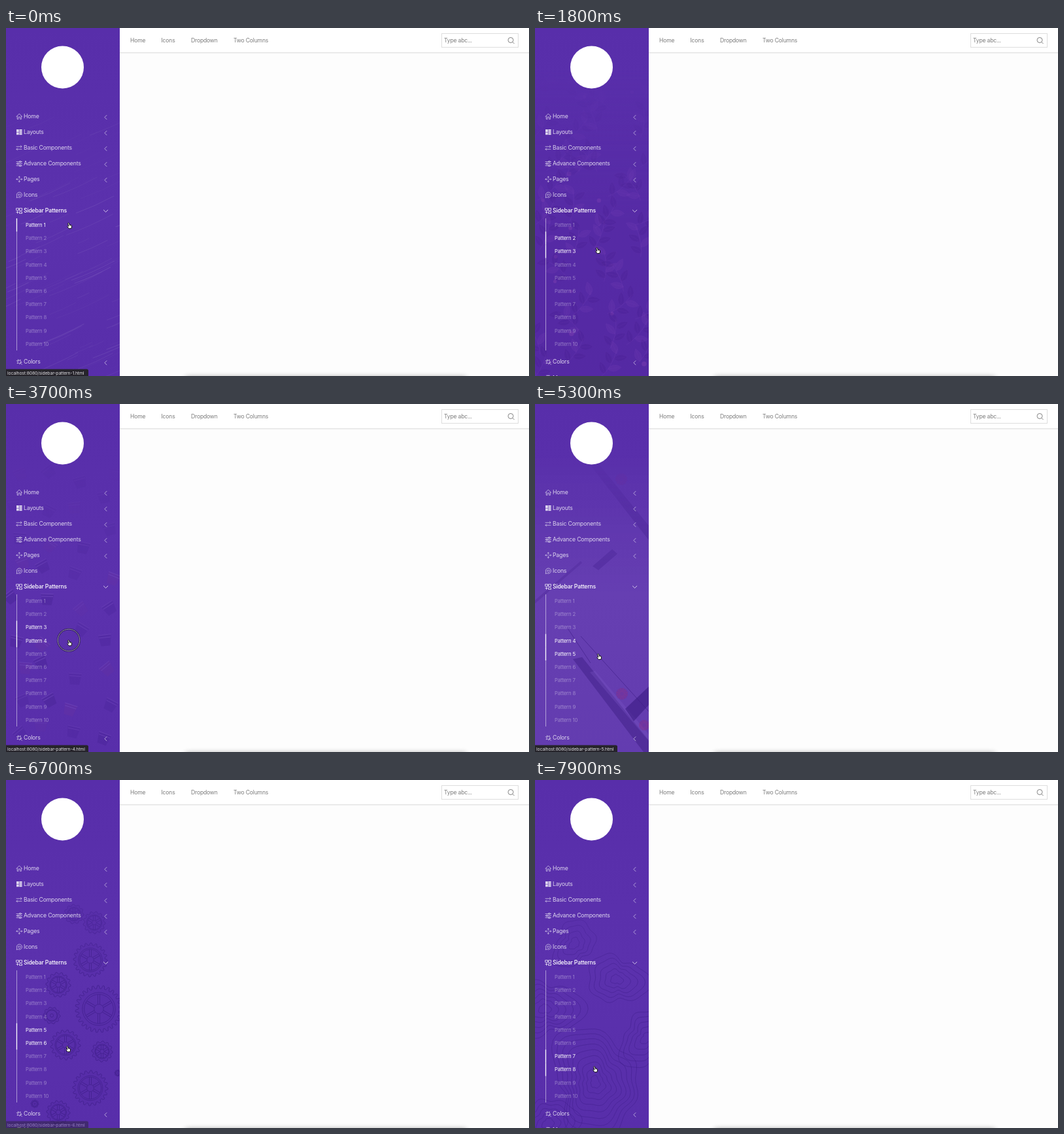
Write an HTML page that moves like this. It is 800 px wide and 532 px high and loops after 8 s.

```html
<!DOCTYPE html>
<html lang="en">
<head>
<meta charset="utf-8">
<title>Sidebar patterns</title>
<style>
html, body { margin: 0; width: 100%; height: 100%; overflow: hidden; background: #fdfdfd; }
svg { display: block; width: 100vw; height: 100vh; }
text { font: 8.7px Inter, Roboto, sans-serif; letter-spacing: -.022em; }
.nav text { font-size: 8.6px; fill: #7c7c7c; }
.menu text { fill: #ddd5ee; }
.menu text.open { fill: #fff; font-weight: 500; }
.icon { fill: none; stroke: #ddd5ee; stroke-width: .7; stroke-linejoin: round; stroke-linecap: round; }
.icon.open { stroke: #fff; }
.icon.solid { fill: #ddd5ee; stroke: none; }
.sub text { font-size: 7.8px; fill: #fff; fill-opacity: .38; }
.sub rect { fill: #fff; opacity: 0; }
.sub .on text { fill-opacity: 1; }
.sub .on rect { opacity: 1; }
#status text { font-size: 6.85px; fill: #dcdcdf; }
</style>
</head>
<body>
<svg id="stage" viewBox="0 0 800 532">
  <defs>
    <clipPath id="side"><rect width="174" height="532"/></clipPath>
    <linearGradient id="purple" x2="0" y2="1">
      <stop stop-color="#582eaa"/><stop offset=".55" stop-color="#5b31ad"/><stop offset="1" stop-color="#582eaa"/>
    </linearGradient>
    <linearGradient id="fade" x2="0" y2="1">
      <stop offset=".12" stop-color="#000"/><stop offset=".55" stop-color="#fff"/>
    </linearGradient>
    <mask id="sink" maskUnits="userSpaceOnUse" x="0" y="0" width="174" height="532">
      <rect width="174" height="532" fill="url(#fade)"/>
    </mask>
    <filter id="soft" x="-10%" y="-150%" width="120%" height="400%"><feGaussianBlur stdDeviation="4.2"/></filter>
  </defs>

  <rect width="800" height="532" fill="#fdfdfd"/>
  <rect x="174" width="626" height="37.5" fill="#fff"/>
  <rect x="174" y="37.3" width="626" height="1.1" fill="#dcdcdc"/>
  <rect x="274" y="534" width="430" height="18" rx="4" opacity=".45" filter="url(#soft)"/>
  <g class="nav">
    <text x="190" y="22.3">Home</text>
    <text x="237.5" y="22.3">Icons</text>
    <text x="283" y="22.3">Dropdown</text>
    <text x="348" y="22.3">Two Columns</text>
    <rect x="666.5" y="8.5" width="117" height="21" fill="#fff" stroke="#dedede"/>
    <text x="670" y="22.3">Type abc...</text>
    <path d="M776 18.5a4 4 0 1 1-8 0a4 4 0 1 1 8 0M775 21.5l2.6 2.6" fill="none" stroke="#777" stroke-width=".9"/>
  </g>

  <rect width="174" height="532" fill="url(#purple)"/>
  <g clip-path="url(#side)"><g id="art" mask="url(#sink)"></g></g>
  <circle cx="86.5" cy="60" r="32.5" fill="#fff"/>
  <g id="menu" class="menu"></g>
  <g id="sub" class="sub"><path d="M16.5 291V493" stroke="#fff" stroke-opacity=".5"/></g>
  <g id="status">
    <path d="M0 521.5H123.5Q126 521.5 126 524V532H0Z" fill="#26242b"/>
    <text x="2" y="529.7"></text>
  </g>
  <g id="ring" fill="none">
    <circle r="16.8" stroke="#2a1a50" stroke-width="2.4"/>
    <circle r="16.8" stroke="#b8afc8" stroke-width=".8"/>
  </g>
  <g id="hand" stroke="#111" stroke-linejoin="round" stroke-linecap="round">
    <path d="M-1.3.5Q-.6-.8.3.2L1.2 2.8L3.4 3.3Q4.7 3.6 4.5 5L4.2 8.2L.6 8.8L-2.3 5.7Q-2 4.4-.4 5Z" fill="#fff" stroke-width="1"/>
    <path d="M1.2 2.8L1.5 4M2.7 3.2L2.9 4.3" stroke-width=".6"/>
  </g>
</svg>
<script>
const $ = id => document.getElementById(id);

function add(parent, tag, attrs, text) {
  const node = document.createElementNS('http://www.w3.org/2000/svg', tag);
  for (const key in attrs) node.setAttribute(key, attrs[key]);
  if (text) node.textContent = text;
  return parent.appendChild(node);
}

let seed = 7;
const rand = (lo, hi) => {
  seed = (seed * 16807) % 2147483647;
  return lo + (hi - lo) * seed / 2147483647;
};

// Closed path from a radius function of the angle.
function polar(x, y, count, radius) {
  let d = '';
  for (let i = 0; i < count; i++) {
    const a = i / count * 2 * Math.PI, r = radius(a, i);
    d += (i ? 'L' : 'M') + (x + r * Math.cos(a)).toFixed(1) + ' ' + (y + r * Math.sin(a)).toFixed(1);
  }
  return d + 'Z';
}

/* Sidebar artwork, one function per pattern */

function strokes(g) {
  for (let i = 0; i < 85; i++) {
    const x = rand(-40, 170), y = rand(120, 540), len = rand(15, 85);
    add(g, 'path', {
      d: `M${x} ${y}q${len / 2} ${-len * .18} ${len} ${-len * .45}`,
      fill: 'none', stroke: '#fff', 'stroke-opacity': rand(.03, .1), 'stroke-width': rand(.5, 1.1)
    });
  }
}

function leaves(g) {
  add(g, 'rect', { width: 174, height: 532, fill: '#4f2099', opacity: .35 });
  for (let i = 0; i < 40; i++) {
    const x = (i % 4) * 48 + rand(-12, 22), y = 110 + Math.floor(i / 4) * 46 + rand(-12, 22);
    const sprig = add(g, 'g', { transform: `translate(${x} ${y}) rotate(${rand(-150, -20)})` });
    add(sprig, 'path', { d: 'M0 0Q20 7 48 0', fill: 'none', stroke: '#7a45b8', 'stroke-opacity': .3, 'stroke-width': .8 });
    for (let k = 0; k < 5; k++) {
      add(sprig, 'path', {
        d: 'M0 0Q8-10 21 0Q8 10 0 0ZM0 0H17',
        transform: `translate(${6 + k * 9} 3) rotate(${k % 2 ? 52 : -52})`,
        fill: (i + k) % 3 ? '#3f1b86' : '#7a3fb2', 'fill-opacity': .2, stroke: '#7a45b8', 'stroke-opacity': .2, 'stroke-width': .6
      });
    }
    if (i % 3 === 0) add(g, 'circle', { cx: rand(5, 170), cy: y, r: rand(2.5, 4), fill: '#8444b4', opacity: .4 });
  }
}

function cups(g) {
  for (let i = 0; i < 36; i++) {
    const x = (i % 4) * 46 + rand(5, 30), y = 100 + Math.floor(i / 4) * 50 + rand(-10, 20);
    const cup = add(g, 'g', { transform: `translate(${x} ${y}) rotate(${rand(-40, 40)})`, opacity: rand(.15, .35) });
    add(cup, 'path', { d: 'M-10-8H10L7 9H-7Z', fill: i % 3 ? '#42208f' : '#6a34a0' });
    add(cup, 'path', { d: 'M-10-8H10M-9-4H9', stroke: '#8a62cc', 'stroke-width': 1 });
  }
}

function rulers(g) {
  add(g, 'rect', { width: 174, height: 532, fill: '#fff', opacity: .07 });
  const shape = (d, fill, opacity) => add(g, 'path', { d, fill, opacity });
  shape('M78 85L92 85L174 186V208Z', '#3e1d85', .45);
  shape('M58 390L72 387L174 514V532H166Z', '#3b1b82', .45);
  shape('M84 410L92 408L174 505V515Z', '#7a55c4', .35);
  shape('M138 466L174 432V460L151 485Z', '#38187f', .55);
  shape('M88 248L118 222L126 229L97 254Z', '#42208d', .4);
  shape('M0 300L70 240L72 243L0 305Z', '#42208d', .3);
  add(g, 'path', { d: 'M50 343L85 396M70 355L174 470', stroke: '#3e1d85', 'stroke-width': 1, opacity: .6 });
  for (const [x, y, r] of [[133, 443, 9], [167, 491, 8], [132, 115, 9]]) {
    add(g, 'circle', { cx: x, cy: y, r, fill: '#7c2b8c', opacity: .4 });
    add(g, 'path', { d: polar(x, y, 24, (a, i) => i % 2 ? r : 3), fill: 'none', stroke: '#8d3b92', 'stroke-width': .5, opacity: .6 });
  }
}

function gears(g) {
  const spots = [[142, 350, 36], [129, 275, 26], [80, 313, 19], [91, 405, 23], [147, 415, 16], [129, 471, 27],
    [80, 508, 18], [44, 495, 6], [135, 218, 17], [70, 360, 13], [171, 448, 5], [104, 205, 15]];
  for (const [x, y, r] of spots) {
    const gear = add(g, 'g', { fill: 'none', stroke: '#35177d', 'stroke-width': 1, opacity: .5 });
    const teeth = Math.max(8, Math.round(r * .75));
    add(gear, 'path', { d: polar(x, y, teeth * 4, (a, i) => i % 4 < 2 ? r : r * .86), fill: '#4a2399', 'fill-opacity': .2 });
    for (const k of [.7, .62, .2]) add(gear, 'circle', { cx: x, cy: y, r: r * k });
    for (let a = 0; a < 360 && r > 14; a += 60)
      add(gear, 'path', { d: `M${r * .2}-1.5H${r * .62}M${r * .2} 1.5H${r * .62}`, transform: `translate(${x} ${y}) rotate(${a + 30})` });
  }
}

function contours(g) {
  for (const [x, y, rings] of [[92, 462, 9], [125, 305, 5], [15, 350, 6], [170, 395, 5], [20, 525, 5], [60, 250, 4]]) {
    const phase = rand(0, 6);
    for (let k = 1; k <= rings; k++)
      add(g, 'path', {
        d: polar(x, y, 64, a => k * 8 * (1 + .2 * Math.sin(2 * a + phase) + .12 * Math.sin(3 * a + k * .25) + .06 * Math.sin(7 * a + phase))),
        fill: 'none', stroke: '#3a1a82', 'stroke-width': .8, opacity: .45
      });
  }
}

const plain = () => {};
const art = [strokes, leaves, cups, rulers, gears, plain, contours].map(draw => {
  const g = add($('art'), 'g');
  draw(g);
  return g;
});

/* Menu */

const menu = [
  ['Home', 135, 'M16 135.5L20.3 131L24.6 135.5M17.2 134.5V139.3H19V136H21.6V139.3H23.4V134.5'],
  ['Layouts', 159, 'M16 155H19.8V158.9H16ZM16 159.4H19.8V163.3H16ZM20.4 155H24.6V157.4H20.4ZM20.4 157.9H24.6V160.3H20.4ZM20.4 160.8H24.6V163.3H20.4Z'],
  ['Basic Components', 183, 'M16 181.3H24M22.4 179.7L24 181.3L22.4 182.9M24 185.3H16M17.6 183.7L16 185.3L17.6 186.9'],
  ['Advance Components', 207, 'M16 204.5H21M23 204.5H24.5M21 203.5H23V205.5H21ZM16 207.5H17.5M19.5 207.5H24.5M17.5 206.5H19.5V208.5H17.5ZM16 210.5H21M23 210.5H24.5M21 209.5H23V211.5H21Z'],
  ['Pages', 231, 'M20.3 227V229.8M20.3 232.4V235.4M16 231.2H18.8M21.8 231.2H24.6M19.2 228L20.3 226.9L21.4 228M19.2 234.4L20.3 235.5L21.4 234.4M17 230.1L15.9 231.2L17 232.3M23.6 230.1L24.7 231.2L23.6 232.3'],
  ['Icons', 255, 'M16.3 259.2L16.6 256.8A4.1 4.1 0 1 1 18.6 258.9ZM20.4 257.4L18.4 255.2Q18.6 253 20.4 254.3Q22.2 253 22.4 255.2Z'],
  ['Sidebar Patterns', 279, 'M16 275.5H19.5V278.5H16ZM21 275.5H24.5V279H21ZM20.8 281H24.5V283.5H20.8ZM16 281.5H19M17.5 280V283.5'],
  ['Colors', 510.3, 'M18.5 507L20 508.4L22.2 507.2L22 509.8L24.2 511L21.8 511.7L21.2 514L19.7 512.2L17 512.7L18.3 510.5L16.4 508.6L18.9 509ZM21.8 511.8L24.5 514.5'],
  ['Maps', 534.5, 'M17.5 531.3H22.5M20 531.3V538']
];
for (const [label, y, icon] of menu) {
  const open = label === 'Sidebar Patterns' ? 'open' : '';
  const solid = label === 'Layouts' ? 'solid' : '';
  add($('menu'), 'path', { d: icon, class: `icon ${open} ${solid}` });
  add($('menu'), 'text', { x: 27, y: y + 3.1, class: open }, label);
  if (label !== 'Icons')
    add($('menu'), 'path', {
      class: `icon ${open}`,
      d: open ? `M149.4 ${y - .8}l3.2 3.2l3.2-3.2` : `M154 ${y - 1.6}l-3.1 3.1l3.1 3.1`
    });
}

const TOP = 291, ROW = 20.2;
const rows = Array.from({ length: 10 }, (_, i) => {
  const g = add($('sub'), 'g');
  add(g, 'rect', { x: 15.8, y: TOP + i * ROW, width: 1.3, height: ROW });
  add(g, 'text', { x: 30, y: TOP + i * ROW + 13 }, 'Pattern ' + (i + 1));
  return g;
});

/* Motion */

const LOOP = 8000, STEP = 100;
const clicks = [-400, 900, 2100, 3700, 5100, 6800, 7100]; // press on pattern 1, 2, ...
const LOAD = 300;                                         // from press to new page
const path = [ // time, x, y of the fingertip
  [0, 96, 298], [500, 96, 298], [800, 96, 318], [1500, 96, 318], [1800, 95, 336], [2100, 96, 341],
  [3100, 96, 341], [3600, 96, 361], [4400, 96, 361], [4900, 97, 382], [6000, 97, 382], [6700, 94, 407],
  [6900, 94, 408], [7000, 93, 415], [7100, 93, 420], [7700, 92, 423], [7800, 92, 430], [7900, 91, 438]
];

function pointer(t) {
  const i = path.findIndex(p => p[0] > t);
  if (i < 0) return path[path.length - 1].slice(1);
  const [t0, x0, y0] = path[i - 1], [t1, x1, y1] = path[i];
  const k = (t - t0) / (t1 - t0);
  return [x0 + (x1 - x0) * k, y0 + (y1 - y0) * k];
}

const last = (t, shift) => clicks.filter(c => c + shift <= t).length - 1;

function statusAlpha(age) {
  if (age < 0) return .45;
  if (age < LOAD + 300) return 1;
  return age < LOAD + 400 ? .45 : 0;
}

function render(t) {
  const [x, y] = pointer(t);
  const active = last(t, LOAD), hover = Math.floor((y - TOP) / ROW);
  rows.forEach((row, i) => row.setAttribute('class', i === active || i === hover ? 'on' : ''));
  art.forEach((g, i) => g.setAttribute('display', i === active ? 'inline' : 'none'));

  const link = last(t, -STEP), age = t - clicks[link];
  $('status').setAttribute('opacity', statusAlpha(age));
  $('status').lastElementChild.textContent = `localhost:8080/sidebar-pattern-${link + 1}.html`;

  const place = `translate(${x} ${y})`;
  $('hand').setAttribute('transform', place);
  $('ring').setAttribute('transform', place);
  $('ring').setAttribute('opacity', age >= 0 && age < 200 ? 1 : 0);
}

const start = performance.now();
function tick() {
  const t = (performance.now() - start) % LOOP;
  render(Math.floor(t / STEP) * STEP);
  requestAnimationFrame(tick);
}
tick();
</script>
</body>
</html>
```
